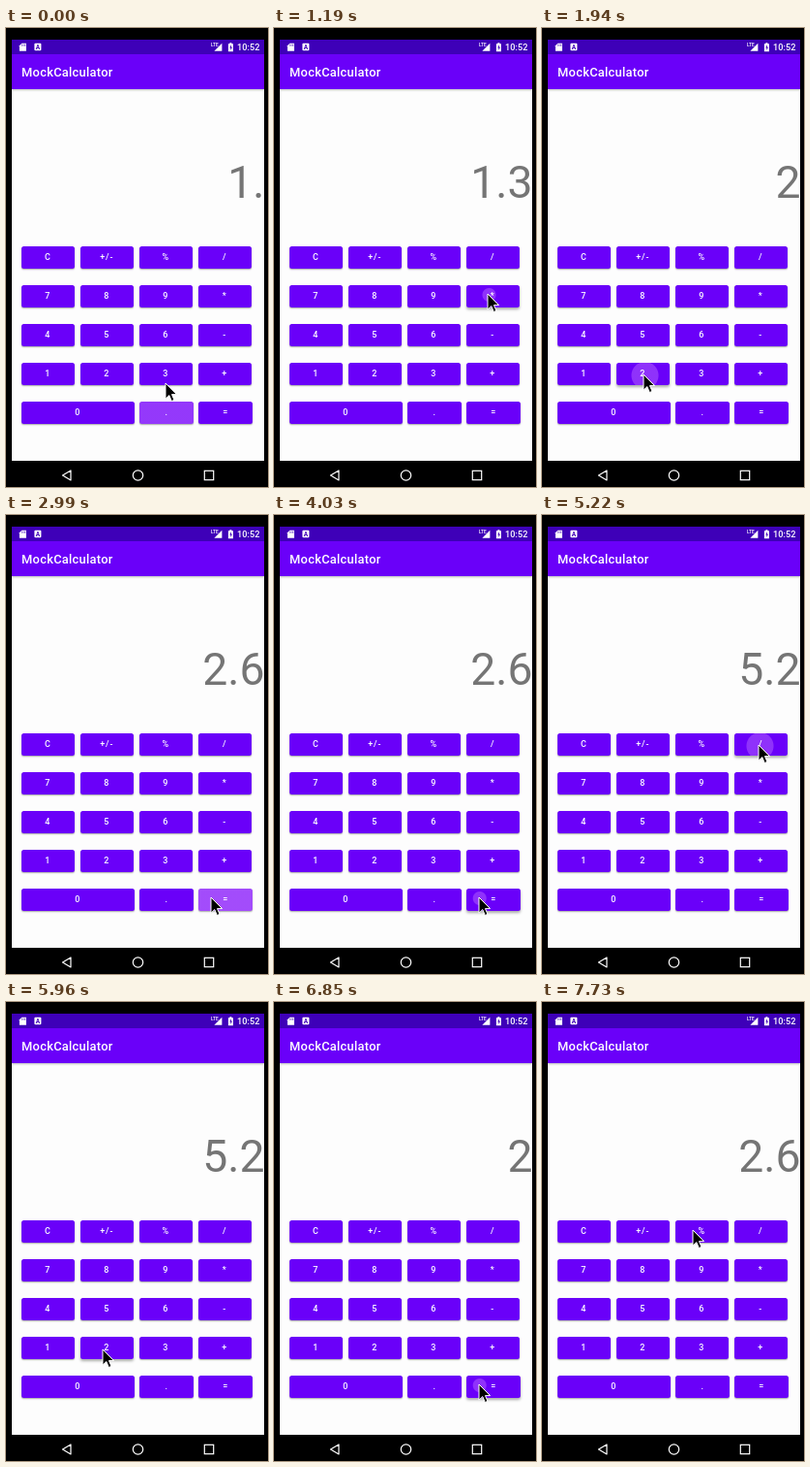
Recreate the animation shown at these times as an HTML page. Size 271 by 473 pixels, loop 8 s.

```html
<!DOCTYPE html>
<html lang="en">
<head>
<meta charset="utf-8">
<title>Calculator</title>
<style>
  html, body { margin: 0; width: 100%; height: 100%; overflow: hidden; background: #000; }
  body { font-family: Roboto, sans-serif; font-weight: 500; color: #fff; }
  #stage { position: absolute; left: 0; top: 0; width: 271px; height: 473px; overflow: hidden; }
  #stage > * { position: absolute; white-space: pre; }
  #screen { left: 6px; top: 12px; width: 261px; height: 434px; background: #fdfdfd; }
  #status { left: 6px; top: 12px; width: 261px; height: 15px; background: #3e00b8; }
  #bar { left: 6px; top: 27px; width: 261px; height: 36px; background: #6a00f9; box-shadow: 0 1px 2px #0004; clip-path: inset(0 0 -4px 0); }
  #title { left: 16px; top: 37px; font-size: 12.9px; line-height: 18px; letter-spacing: .02em; }
  #clock { right: 8.6px; top: 14px; font-size: 9.2px; line-height: 12px; }
  #display { right: 3.5px; top: 131.2px; font-size: 46.3px; line-height: 56px; font-weight: 400; color: #757575; }
  .key { height: 23px; border-radius: 2.5px; background-color: #6a00f9; font-size: 9px; line-height: 23px; letter-spacing: .8px; text-align: center; box-shadow: 0 1px 1.5px #0005; }
  .key.raised { box-shadow: 0 2px 3px #0005; }
  svg { left: 0; top: 0; }
</style>
</head>
<body>
<div id="stage">
  <div id="screen"></div>
  <div id="bar"></div>
  <div id="status"></div>
  <div id="title">MockCalculator</div>
  <div id="clock">10:52</div>
  <div id="display"></div>
  <svg id="icons" width="271" height="473" fill="#fff">
    <g transform="translate(.4 -.3)">
      <path d="M16 16h4.5v8h-7v-5.5z"/>
      <path d="M16.2 17v2M17.8 17v2M19.3 17v2" stroke="#3e00b8" stroke-width=".6"/>
      <rect x="29" y="16" width="7" height="7.5" rx="1"/>
      <text x="32.5" y="22.2" font-size="6.5" font-weight="700" text-anchor="middle" fill="#3e00b8">A</text>
      <path d="M223 16v8h-8z"/>
      <text x="211.5" y="19.3" font-size="4.8">LTE</text>
      <path d="M231 15.5h2v1h1.5v8h-5v-8h1.5z"/>
      <path d="M232.5 17.5l-1.7 3.3h1.2v2.5l1.6-3.3h-1.1z" fill="#3e00b8"/>
    </g>
    <g fill="none" stroke="#fff" stroke-width="1.2">
      <path d="M67 456v10l-8.5-5z" stroke-linejoin="round"/>
      <circle cx="136.5" cy="461" r="5.2"/>
      <rect x="205.3" y="456.3" width="9.4" height="9.4"/>
    </g>
  </svg>
  <svg id="cursor" width="16" height="22" style="overflow:visible;z-index:2">
    <path d="M0 0V16.2L3.8 12.6L6.3 18.5L9 17.4L6.5 11.6H11.6Z" stroke="#fff" stroke-width="1" stroke-linejoin="round"/>
  </svg>
</div>
<script>
const LOOP = 8000, STEP = 148.6, TRAVEL = 4;
const $ = id => document.getElementById(id);
const keys = {};

function addKey(label, x, y, width = 55.5) {
  const el = document.createElement('div');
  el.className = 'key';
  el.textContent = label;
  el.style.cssText = `left:${x}px;top:${y}px;width:${width}px`;
  $('stage').append(el);
  keys[label] = { el, x, y };
}

[['C', '+/-', '%', '/'], ['7', '8', '9', '*'], ['4', '5', '6', '-'], ['1', '2', '3', '+']]
  .forEach((row, r) => row.forEach((label, c) => addKey(label, 15.5 + 61 * c, 225 + 40 * r)));
addKey('0', 15.5, 385, 117.5);
addKey('.', 138.3, 385);
addKey('=', 199.3, 385);

const taps = [
  ['.', -2.3, 165, 366, '1.'],
  ['3', 1, 165, 366, '1.3'],
  ['*', 8, 221, 274, '1.3'],
  ['2', 12, 105, 357, '2'],
  ['=', 18, 212, 394, '2.6'],
  ['=', 27, 212, 394, '5.2'],
  ['/', 34, 224, 237, '5.2'],
  ['2', 40.5, 100, 358, '2'],
  ['=', 46, 212, 394, '2.6'],
  ['%', 60, 156, 235, '2.6']
].map(([label, at, x, y, shown]) => ({ label, at, x, y, shown }));

const clamp = v => Math.min(1, Math.max(0, v));
const smooth = k => k * k * (3 - 2 * k);

// The pointer leaves one step after a tap and eases over to the next key.
function pointerAt(n) {
  const i = taps.findIndex(t => t.at + 1 > n);
  const to = taps[i], from = taps[i - 1];
  const leave = from.at + 1;
  const arrive = Math.min(leave + TRAVEL, to.at);
  const k = smooth(clamp((n - leave) / (arrive - leave)));
  return [from.x + (to.x - from.x) * k, from.y + (to.y - from.y) * k];
}

function showTap({ label, at, x, y }, n) {
  const age = n - at, key = keys[label];
  if (age <= -.9 || age >= 3.2) return;
  key.el.classList.toggle('raised', age < 2);
  if (age < 0) return;
  const filled = age >= 1.5;
  const alpha = filled ? .38 - .33 * clamp(age - 2) : .25;
  const radius = filled ? 99 : 7 + 7 * age;
  key.el.style.backgroundImage = `radial-gradient(circle at ${x + 1 - key.x}px ${y + 1 - key.y}px,
    rgba(255,200,255,${alpha}) ${radius - .5}px, transparent ${radius + .5}px)`;
}

function draw(ms) {
  const n = Math.min(52, Math.max(0, Math.floor((ms % LOOP - 1) / STEP)));
  for (const { el } of Object.values(keys)) {
    el.classList.remove('raised');
    el.style.backgroundImage = 'none';
  }
  taps.forEach(tap => showTap(tap, n));
  $('display').textContent = taps.filter(t => t.at + .5 <= n).pop().shown;
  const [x, y] = pointerAt(n);
  $('cursor').style.transform = `translate(${x}px,${y}px)`;
}

const begin = performance.now();
function tick() {
  draw(performance.now() - begin);
  requestAnimationFrame(tick);
}
tick();
</script>
</body>
</html>
```
